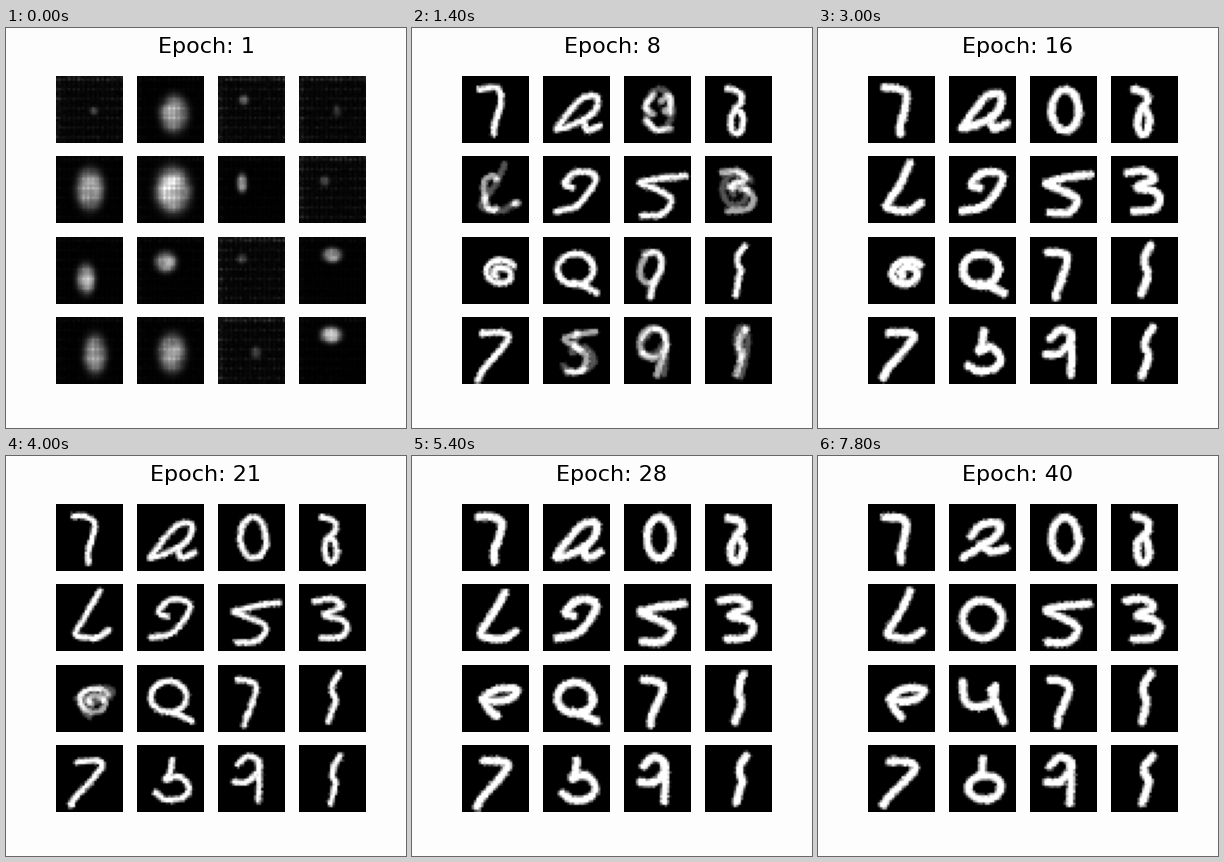
A matplotlib script that plays this animation: 400x400 px, repeating every 8 s.

```python
import numpy as np
import matplotlib.pyplot as plt
from matplotlib.animation import FuncAnimation

EPOCHS, INTERVAL = 40, 200
GRID, SIDE = 28, 67
PAPER = "#fdfdfd"

centers = (np.arange(GRID) + 0.5) * SIDE / GRID
X, Y = np.meshgrid(centers, centers)


def line(*points):
    """Smooth pen path through a few points."""
    p = np.array(points, float)
    p = np.vstack([2 * p[0] - p[1], p, 2 * p[-1] - p[-2]])
    t = np.linspace(0, 1, 10)[:, None]
    return np.vstack([
        b + 0.5 * t * (c - a + t * (2 * a - 5 * b + 4 * c - d + t * (3 * (b - c) + d - a)))
        for a, b, c, d in zip(p, p[1:], p[2:], p[3:])])


def ring(cx, cy, rx, ry, start=0, stop=360, shrink=1):
    """Arc of an ellipse; shrink < 1 winds it into a spiral."""
    a = np.radians(np.linspace(start, stop, 70))
    k = np.linspace(1, shrink, 70)
    return np.column_stack([cx + k * rx * np.cos(a), cy + k * ry * np.sin(a)])


# Handwriting in a box of 10 by 10, y down
GLYPHS = {
    "0": [ring(5, 5, 5, 5)],
    "1": [line((10, 0), (4, 2), (3, 4), (6, 5.5), (4, 7.5), (0, 10))],
    "2": [line((4, 4), (2, 3), (5, 0), (9, 0), (10, 2), (8, 6), (5, 9), (0, 10))],
    "2 tail": [line((2, 4), (4, 1), (7, 0), (8.6, 1), (7.5, 4), (4, 7), (0, 10)),
               line((4, 6.5), (7, 8.5), (10, 7.5))],
    "3": [line((0, 0.5), (5, 0), (8, 2), (3, 4), (8, 5), (10, 7), (8, 9.5), (2, 10))],
    "4": [line((0, 0), (0.5, 5), (3, 6.5), (7, 5.5), (8, 1)), line((7, 2), (8.5, 6), (10, 10))],
    "5": [line((10, 0), (5, 0.7), (2, 1.5), (0.5, 2.2), (4, 4), (7, 6), (7, 8), (5, 10), (1, 10))],
    "7": [line((0, 0), (5, 0), (9, 0.7), (10, 2.2), (8.5, 5.5), (7, 8), (7, 10))],
    "8": [line((0, 0), (8, 1), (9, 3), (5, 4.5)), ring(6, 7.5, 4, 2.7)],
    "9": [line((1, 2), (5, 0), (9, 1), (9, 3), (5, 5.5), (0, 5.5)), line((9, 1.5), (9.5, 5), (9, 10))],
    "9 closed": [ring(5, 3.3, 5, 3.3), line((9, 5), (7, 8), (6, 10))],
    "a": [line((0, 10), (3, 5), (6, 1), (9, 0.5), (9, 3.5), (7, 6.5), (3, 9), (0, 10)),
          line((6, 7), (7, 10), (10, 8.5))],
    "b": [line((4.5, 0), (4, 3), (3, 5), (7, 4), (10, 7), (8, 9.5), (3, 10), (0, 8.5))],
    "b closed": [line((4.5, 0), (4, 3.5)), ring(5, 7, 5, 3)],
    "c": [ring(3, 6.3, 2.5, 3.7, -60, -300), line((10, 8.5), (11, 8.2))],
    "e": [line((0, 4), (3, 1), (7, 0), (10, 1), (8, 4), (4, 5), (0.5, 4)), line((0, 4), (2, 8), (4, 10))],
    "L": [line((7, 0), (5, 3), (3, 5.5), (0, 9), (3, 10), (7, 10), (10, 8.5))],
    "Q": [ring(4.5, 4, 4.5, 4), line((4, 7.5), (7, 8.5), (10, 10))],
    "broken": [line((3, 1.5), (0, 4), (3, 6)), line((6, 3), (9, 1.5), (9, 4), (7, 5.5), (9, 6)),
               line((0, 8), (4, 10), (10, 9.5))],
    "spiral": [ring(5, 5, 5, 5, -40, -580, 0.3)],
}


class Cell:
    """Box and lean of the writing, glyph per epoch, first bright patch (x, y, radii, level)."""

    def __init__(self, box, stages, patch, lean=0):
        self.box, self.stages, self.patch, self.lean = box, stages, patch, lean

    def place(self, glyph):
        x0, y0, x1, y1 = self.box
        p = np.vstack(GLYPHS[glyph]) / 10
        return np.column_stack([x0 + p[:, 0] * (x1 - x0) + self.lean * p[:, 1],
                                y0 + p[:, 1] * (y1 - y0)])


CELLS = [
    Cell((17, 13, 39, 58), {4: "7"}, (38, 35, 4, 4, 0.3)),
    Cell((14, 18, 57, 53), {4: "a", 33: "2 tail"}, (37, 38, 13, 17, 0.8)),
    Cell((22, 14, 48, 54), {4: "broken", 10: "0"}, (26, 24, 5, 5, 0.4)),
    Cell((23, 13, 38, 57), {4: "8"}, (38, 35, 4, 6, 0.2)),
    Cell((19, 8, 53, 54), {4: "c", 10: "L"}, (34, 33, 13, 19, 0.75)),
    Cell((14, 17, 53, 54), {4: "2", 39: "0"}, (36, 34, 16, 21, 0.95)),
    Cell((14, 19, 60, 58), {4: "5"}, (24, 27, 5, 9, 0.7)),
    Cell((16, 15, 49, 55), {4: "spiral", 9: "3"}, (26, 25, 5, 5, 0.25)),
    Cell((21, 23, 56, 51), {4: "spiral", 23: "e"}, (30, 42, 9, 14, 0.8)),
    Cell((14, 17, 54, 56), {4: "Q", 33: "4"}, (29, 25, 10, 10, 0.8)),
    Cell((19, 16, 40, 60), {4: "9 closed", 10: "7"}, (24, 22, 5, 5, 0.25), lean=-7),
    Cell((30, 9, 40, 57), {4: "1"}, (33, 18, 9, 7, 0.8)),
    Cell((21, 16, 50, 61), {4: "7"}, (39, 37, 11, 18, 0.7), lean=-26),
    Cell((20, 15, 52, 54), {4: "5", 10: "b", 33: "b closed"}, (35, 36, 13, 18, 0.7)),
    Cell((17, 12, 43, 57), {4: "9 closed", 10: "9"}, (38, 36, 5, 6, 0.3)),
    Cell((31, 11, 42, 58), {4: "9 closed", 9: "1"}, (32, 18, 10, 8, 0.8)),
]


def haze(cell, seed):
    """Lumpy patch over the dotted lattice of an untrained network."""
    rng = np.random.default_rng(seed)
    x, y, rx, ry, level = cell.patch
    i = np.arange(GRID)
    lattice = np.outer(0.4 + 0.6 * (i % 4 == 1), 0.5 + 0.5 * (i % 2))
    edge = 0.6 + 2 * np.exp(-np.minimum(X, Y) / 3)
    grain = rng.uniform(0.3, 1.2, (GRID, GRID))
    lumps = np.kron(rng.uniform(0.65, 1.1, (7, 7)), np.ones((4, 4)))
    lumps = (lumps + np.roll(lumps, 2, 0) + np.roll(lumps, 2, 1)) / 3
    glow = level * np.exp(-(((X - x) / rx) ** 2 + ((Y - y) / ry) ** 2) ** 1.6)
    base = (0.16 if level < 0.5 else 0.04) * lattice * edge * grain
    return base + glow * lumps * (0.85 + 0.3 * lattice)


def ink(points, epoch, rng):
    """Pen marks on the grid; the hand gets steadier and the weight swings."""
    t = np.linspace(0, 4, len(points))
    sway = rng.normal(0, 0.5 + 3 / epoch, (2, 5))
    pts = points + np.column_stack([np.interp(t, range(5), s) for s in sway])
    dist = np.sqrt(((X[..., None] - pts[:, 0]) ** 2 + (Y[..., None] - pts[:, 1]) ** 2).min(-1))
    dist += rng.normal(0, 0.4, dist.shape) * (dist < 6)
    half = 3.5 + 0.55 * np.cos(2 * np.pi * (epoch - 4) / 12)
    return np.clip((half - dist) / 2.8 + 0.5, 0, 1)


def picture(index, epoch):
    cell = CELLS[index]
    if epoch == 1:
        return haze(cell, index)
    rng = np.random.default_rng(100 * epoch + index)
    img = haze(cell, index)
    for start, glyph in cell.stages.items():
        mix = np.clip((epoch - start) / 3 + 1, 0, 1)
        if mix > 0:
            img = img + mix * (ink(cell.place(glyph), epoch, rng) - img)
    return img


fig, axes = plt.subplots(4, 4, figsize=(4, 4), dpi=100, facecolor=PAPER)
title = fig.suptitle("Epoch: 1", fontsize=16, y=0.9775)
images = []
for ax in axes.flat:
    ax.axis("off")
    images.append(ax.imshow(np.zeros((GRID, GRID)), cmap="gray", vmin=0, vmax=1))


def draw(frame):
    epoch = frame + 1
    title.set_text(f"Epoch: {epoch}")
    for index, im in enumerate(images):
        im.set_data(picture(index, epoch))
    return [title, *images]


anim = FuncAnimation(fig, draw, frames=EPOCHS, interval=INTERVAL,
                     init_func=lambda: draw(0), repeat=True, repeat_delay=0)
plt.show()
```
